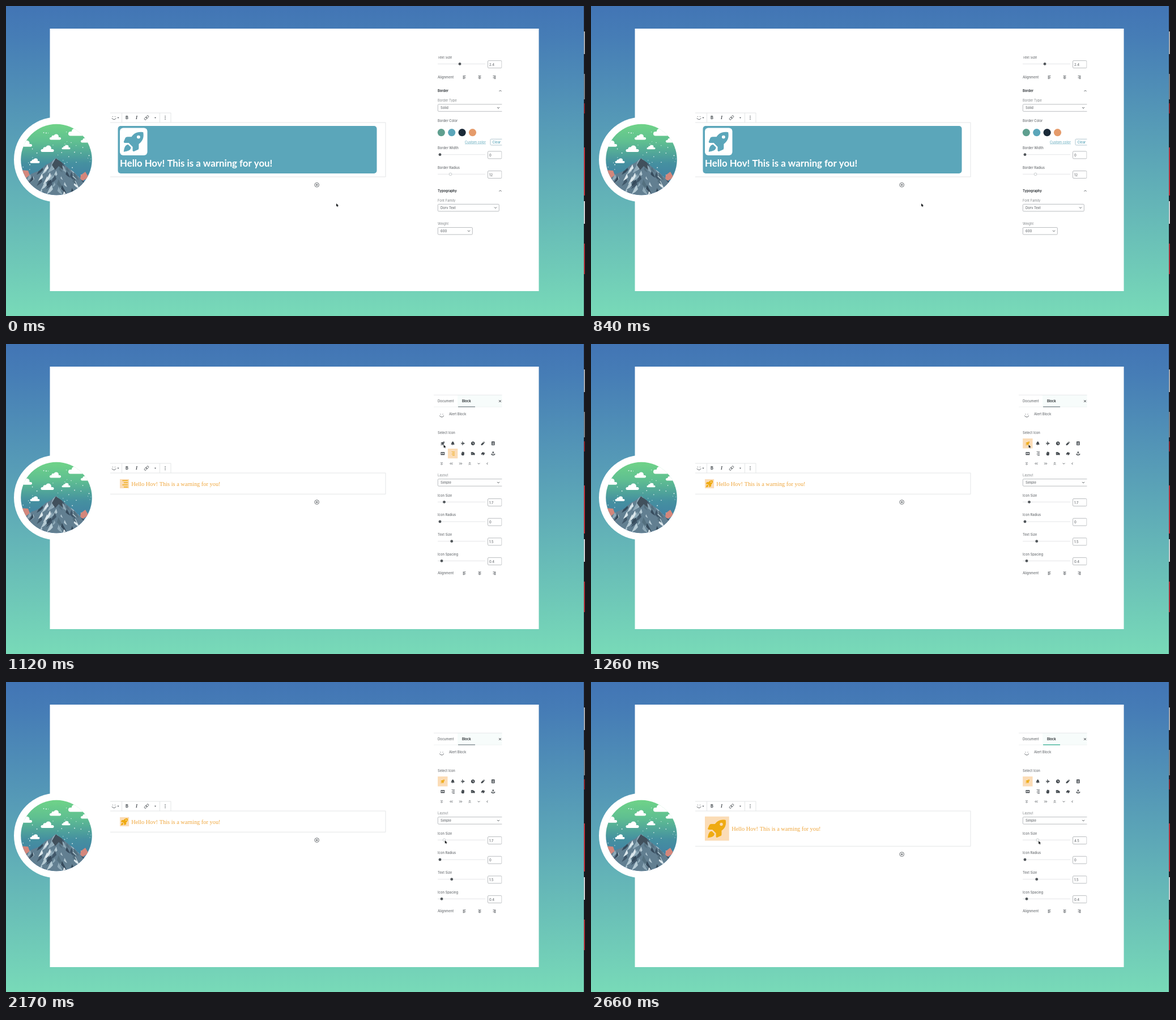
An HTML page with a canvas for the animation above (2.73 s loop, 1022 by 548 pixels).

```html
<!DOCTYPE html>
<html lang="en">
<head>
<meta charset="utf-8">
<title>Alert block settings</title>
<style>
html, body { margin: 0; width: 100%; height: 100%; overflow: hidden; }
canvas { display: block; }
</style>
</head>
<body>
<canvas id="stage" width="1022" height="548"></canvas>
<script>
const ctx = document.getElementById('stage').getContext('2d');
const LOOP = 2730, STEP = 70;
const TEAL = '#5ba6ba', ORANGE = '#efab12', PEACH = '#fbdcb6', DARK = '#444a4f', GREY = '#6c7074', LINE = '#e3e5e6';
const MESSAGE = 'Hello Hov! This is a warning for you!';

// Icons live in a 10 x 10 box, the rocket in a 36 x 36 box.
const ICONS = {
  rocket: 'M35 1C23-1 18 4 14 9H7Q4 9 3 11L0 18Q0 20 2 20H9L16 27V34Q17 36 19 35L26 32Q27 31 27 29V22C32 18 37 13 35 1ZM29.5 9.5a3 3 0 1 0-6 0a3 3 0 1 0 6 0ZM8 23C3 23 1 28 0 36C8 35 13 33 13 28Z',
  bell: 'M5 0C8 1 8 4 9.5 8H.5C2 4 2 1 5 0ZM4 8.7h2v1.3h-2Z',
  plane: 'M0 2L2 4H4L3 0H4.3L7 4H9Q11 5 9 6H7L4.3 10H3L4 6H2L0 8L1 5Z',
  clock: 'M5 0a5 5 0 1 0 .01 0ZM4.4 2h1.2v3l2 1.2-.6 1-2.6-1.6Z',
  pencil: 'M7 0L10 3L9 4L6 1ZM5.3 1.7L8.3 4.7L3 10H0V7Z',
  book: 'M1 0H9V10H1ZM5 2a1.4 1.4 0 1 0 .01 0ZM2.8 8Q3 5.5 5 5.5T7.2 8Z',
  card: 'M0 1.2H10V8.8H0ZM1.5 3.5h3v3h-3ZM5.5 3.5h3v3h-3Z',
  lines: 'M2 0h8v1.2h-8ZM4 3h6v1.2h-6ZM2 6h8v1.2h-8ZM4 9h6v1.2h-6Z',
  hand: 'M2.5 10L0 5H1L2 6V1.5H3.6V0H5V.7H6.6V1.7H8.6V7L7.5 10Z',
  truck: 'M0 1H6V3H8L10 5V8H9a1.3 1.3 0 1 1-2.6 0H4a1.3 1.3 0 1 1-2.6 0H0ZM2 3.6h2v1.4h-2Z',
  sign: 'M0 6L3 2L7 1L6 3L10 3L8 8L4 10L5 7L1 8Z',
  anchor: 'M4.4 3.5H3V2a2 2 0 1 1 4 0V3.5H5.6V8.5Q8 8 8.3 6.5H7L9 5L10.5 7Q9 10 5 10T-.5 7L1 5L3 6.5H1.7Q2 8 4.4 8.5Z',
  arrow: 'M0 0L0 9L2.2 7.2L3.8 10.5L5.4 9.8L4 6.6L6.8 6.5Z'
};
const paths = Object.fromEntries(Object.entries(ICONS).map(([name, d]) => [name, new Path2D(d)]));
const GRID = ['rocket', 'bell', 'plane', 'clock', 'pencil', 'book', 'card', 'lines', 'hand', 'truck', 'sign', 'anchor'];

const lerp = (a, b, p) => a + (b - a) * p;
const progress = (t, from, to) => t < from ? 0 : t > to ? 1 : (t - from) / (to - from);

function seeded(seed) {
  return () => (seed = (seed * 16807) % 2147483647) / 2147483647;
}

function rect(x, y, w, h, fill, stroke, r = 0) {
  ctx.beginPath();
  ctx.roundRect(x, y, w, h, r);
  if (fill) { ctx.fillStyle = fill; ctx.fill(); }
  if (stroke) { ctx.strokeStyle = stroke; ctx.lineWidth = 0.8; ctx.stroke(); }
}

function disc(x, y, r, fill, stroke) {
  ctx.beginPath();
  ctx.arc(x, y, r, 0, 7);
  if (fill) { ctx.fillStyle = fill; ctx.fill(); }
  if (stroke) { ctx.strokeStyle = stroke; ctx.lineWidth = 0.8; ctx.stroke(); }
}

function line(color, width, ...points) {
  ctx.beginPath();
  for (let i = 0; i < points.length; i += 2) ctx.lineTo(points[i], points[i + 1]);
  ctx.strokeStyle = color;
  ctx.lineWidth = width;
  ctx.stroke();
}

function shape(fill, ...points) {
  ctx.beginPath();
  for (let i = 0; i < points.length; i += 2) ctx.lineTo(points[i], points[i + 1]);
  ctx.fillStyle = fill;
  ctx.fill();
}

function text(s, x, baseline, color, font) {
  ctx.font = font;
  ctx.fillStyle = color;
  ctx.fillText(s, x, baseline);
}

// Small interface text, centred on y.
function label(s, x, y, color = GREY, weight = 500) {
  text(s, x, y + 2.1, color, `${weight} 5.8px Inter, sans-serif`);
}

function icon(name, x, y, size, color, outline) {
  const k = size / (name === 'rocket' ? 36 : 10);
  ctx.save();
  ctx.translate(x - size / 2, y - size / 2);
  ctx.scale(k, k);
  if (outline) { ctx.strokeStyle = outline; ctx.lineWidth = 1.6; ctx.stroke(paths[name]); }
  ctx.fillStyle = color;
  ctx.fill(paths[name], 'evenodd');
  ctx.restore();
}

function chevron(x, y, turns, size = 2, color = DARK) {
  ctx.save();
  ctx.translate(x, y);
  ctx.rotate(turns * Math.PI / 2);
  line(color, 0.9, -size, -size / 2, 0, size / 2, size, -size / 2);
  ctx.restore();
}

function smile(x, y) {
  disc(x - 2, y - 2, 0.6, DARK);
  disc(x + 2, y - 2, 0.6, DARK);
  ctx.beginPath();
  ctx.arc(x, y - 0.8, 3.8, 0.35, Math.PI - 0.35);
  ctx.strokeStyle = DARK;
  ctx.lineWidth = 0.8;
  ctx.stroke();
}

function cloud(x, y, w) {
  rect(x - w / 2, y, w, w * 0.22, '#fff', null, w * 0.11);
  disc(x - w * 0.17, y, w * 0.16, '#fff');
  disc(x + w * 0.08, y - w * 0.06, w * 0.22, '#fff');
}

function badge() {
  const rand = seeded(77);
  disc(89, 271.5, 75, '#fff');
  ctx.save();
  ctx.beginPath();
  ctx.arc(89, 271.5, 62.8, 0, 7);
  ctx.clip();
  const sky = ctx.createLinearGradient(0, 209, 0, 334);
  sky.addColorStop(0, '#6fd388');
  sky.addColorStop(0.25, '#5fbf91');
  sky.addColorStop(0.55, '#4590a0');
  sky.addColorStop(1, '#3f74a8');
  ctx.fillStyle = sky;
  ctx.fillRect(26, 208, 126, 127);
  for (let i = 0; i < 45; i++) disc(28 + rand() * 122, 222 + rand() * 80, 0.5 + rand() * 0.5, '#e8f6f4');
  [[87, 232, 20], [73, 253, 23], [106, 250, 15], [51, 274, 17], [127, 222, 34], [142, 237, 20], [35, 244, 22]]
    .forEach(c => cloud(...c));

  shape('#d4877c', 26, 290, 39, 291, 46, 310, 40, 330, 26, 320);
  shape('#d4877c', 132, 299, 140, 293, 146, 303, 130, 312);
  ctx.beginPath();
  [26, 312, 44, 297, 59, 291, 70, 281, 78, 277, 88, 269, 99, 277, 108, 285, 119, 293, 134, 308, 152, 318, 152, 336, 26, 336]
    .forEach((v, i, all) => i % 2 || ctx.lineTo(v, all[i + 1]));
  ctx.clip();
  ctx.fillStyle = '#627f91';
  ctx.fillRect(26, 266, 126, 70);
  const tones = ['#364b5c', '#dbe7ec', '#8faab8', '#41586a', '#b4cad4', '#54707f'];
  for (let i = 0; i < 95; i++) {
    const x = 28 + rand() * 122, y = 272 + rand() * 62, s = 3 + rand() * 6, lean = x < 89 ? -s : s;
    shape(tones[i % tones.length], x, y - s, x + lean, y + s, x + lean * 0.2, y + s * 0.5, x - lean * 0.3, y);
  }
  shape('#41505c', 88, 269, 81, 281, 87, 290, 93, 283, 101, 290, 98, 276);
  ctx.restore();
}

function backdrop() {
  const g = ctx.createLinearGradient(0, 0, 0, 548);
  g.addColorStop(0, '#4275b5');
  g.addColorStop(0.1, '#467db6');
  g.addColorStop(1, '#78dab8');
  ctx.fillStyle = g;
  ctx.fillRect(0, 0, 1022, 548);
  rect(1020, 0, 2, 548, '#1c1b22');
  [[45, 40, '#a5a6aa'], [120, 45, '#77797e'], [172, 18, '#7d2028'], [250, 85, '#b52f3a'], [345, 40, '#c9cacc'], [420, 54, '#a32b36']]
    .forEach(([y, h, color]) => rect(1020, y, 2, h, color));
  rect(77.5, 40, 863, 464, '#fff');
  badge();
}

function toolbar(y) {
  const mid = y + 8.5;
  line(LINE, 1, 184, y, 291, y, 291, y + 17);
  [204.5, 271.5].forEach(x => line(LINE, 1, x, y, x, y + 17));
  smile(190.5, mid);
  [198, 263.5].forEach(x => shape(DARK, x - 1.5, mid - 0.7, x + 1.5, mid - 0.7, x, mid + 1.2));
  text('B', 211, mid + 2.7, DARK, '700 7.5px Inter, sans-serif');
  text('I', 229, mid + 2.7, DARK, 'italic 700 8px "Liberation Serif", serif');
  ctx.save();
  ctx.translate(248, mid);
  ctx.rotate(-Math.PI / 4);
  rect(-4.6, -1.6, 5, 3.2, null, DARK, 1.6);
  rect(-0.4, -1.6, 5, 3.2, null, DARK, 1.6);
  ctx.restore();
  [-2.8, 0, 2.8].forEach(d => disc(281, mid + d, 0.75, DARK));
}

function editorBlock(top, bottom) {
  toolbar(top - 17);
  line(LINE, 1, 184, top, 670, top, 670, bottom, 184, bottom);
  const y = bottom + 14.2;
  disc(548.7, y, 3.8, null, DARK);
  line(DARK, 0.9, 546.8, y, 550.6, y);
  line(DARK, 0.9, 548.7, y - 1.9, 548.7, y + 1.9);
}

function slider(name, y, knob, value, active) {
  label(name, 762, y);
  line('#dcdfe1', 0.8, 762, y + 11.7, 846, y + 11.7);
  active ? disc(knob, y + 11.7, 2.3, '#fff', '#b9bec1') : disc(knob, y + 11.7, 2.4, '#51565a');
  rect(850.5, y + 5.9, 24.5, 13, '#fff', '#a9adb0', 1.5);
  label(value, 853, y + 12.8);
}

function select(name, y, width, value) {
  label(name, 762, y, '#85898c', 400);
  rect(762.3, y + 6.8, width, 12.5, '#fff', '#a9adb0', 1.5);
  label(value, 767, y + 13);
  chevron(762 + Math.min(width, 113) - 6, y + 13, 0);
}

function alignment(y) {
  label('Alignment', 762, y);
  [[809, 0], [836, 0.5], [862, 1]].forEach(([x, side]) => {
    [5, 3, 5, 3].forEach((w, i) => {
      const left = x - 2.5 + (5 - w) * side, row = y - 2.4 + i * 1.6;
      line(DARK, 0.8, left, row, left + w, row);
    });
  });
}

function section(name, y) {
  label(name, 762, y, '#22272b', 600);
  chevron(872.5, y, 2);
}

function clipSidebar() {
  ctx.save();
  ctx.beginPath();
  ctx.rect(755, 89, 120.4, 330);
  ctx.clip();
}

function stylePanel() {
  clipSidebar();
  slider('Text Size', 90.7, 801, '2.4');
  alignment(126);
  section('Border', 150);
  select('Border Type', 167, 116, 'Solid');
  label('Border Color', 762, 202.8);
  ['#5f9f8f', TEAL, '#1b2a38', '#e59b6b'].forEach((c, i) => disc(768.3 + i * 18.4, 223.6, 6.6, c));
  label('Custom color', 810, 240.7, TEAL, 400);
  line(TEAL, 0.5, 810, 243.9, 847, 243.9);
  rect(855, 235.3, 23, 10.6, '#fff', '#9fb9c4', 1.5);
  label('Clear', 858.5, 240.7, TEAL);
  slider('Border Width', 251, 766, '0');
  slider('Border Radius', 285.6, 784.5, '12', true);
  section('Typography', 326.8);
  select('Font Family', 343.6, 108, 'Dorv Text');
  select('Weight', 384.7, 61, '600');
  ctx.restore();
}

function iconGrid(selected) {
  GRID.forEach((name, i) => {
    const x = 770.8 + (i % 6) * 17.8, y = i < 6 ? 175.7 : 193.6, on = selected.includes(name);
    if (on) rect(x - 8.7, y - 8.7, 17.4, 17.4, PEACH);
    icon(name, x, y, name === 'sign' && on ? 8.5 : 6.8, on ? ORANGE : DARK);
  });
  const y = 211.4;
  [[769, 0], [818.5, 2]].forEach(([x, turn]) => [-1.3, 1.3].forEach(d => chevron(x, y + d, turn, 1.7)));
  [[786, 1], [802.5, 3]].forEach(([x, turn]) => [-1.3, 1.3].forEach(d => chevron(x + d, y, turn, 1.7)));
  chevron(834.5, y, 0, 1.7);
  chevron(849.5, y, 1, 1.7);
}

function blockPanel(t, selected, size) {
  clipSidebar();
  rect(755, 90, 121, 21, '#f7fcfb');
  rect(755, 90, 42, 21, '#fff');
  line(LINE, 0.8, 755, 90.2, 876, 90.2);
  line('#edf0f0', 0.8, 755, 111.2, 876, 111.2);
  line(t >= 2660 ? '#4db89f' : '#8a9599', 1.4, 798, 111, 828, 111);
  label('Document', 762, 101);
  label('Block', 805, 101, '#22272b', 600);
  line(DARK, 0.9, 870, 99, 874, 103);
  line(DARK, 0.9, 874, 99, 870, 103);
  smile(769, 126);
  label('Alert Block', 782, 124);
  label('Select Icon', 762, 156.7);
  iconGrid(selected);
  select('Layout', 231.9, 116, 'Simple');
  slider('Icon Size', 267.6, lerp(773.5, 788.3, (size - 1.7) / 2.8), size.toFixed(1), t >= 2100);
  slider('Icon Radius', 302.3, 766, '0');
  slider('Text Size', 337, 786.7, '1.5');
  slider('Icon Spacing', 371.7, 769, '0.4');
  alignment(405.3);
  ctx.restore();
}

function arrow(x, y) {
  icon('arrow', x + 3, y + 3, 6, '#15181a', '#fff');
}

function warningScene() {
  editorBlock(206, 302);
  rect(197.5, 212, 457, 84, TEAL, null, 5);
  rect(201, 215.6, 48.5, 48.5, '#fff', null, 6);
  icon('rocket', 225.5, 240, 35.5, TEAL);
  text(MESSAGE, 201, 284.3, '#fff', '700 16.8px Lato, sans-serif');
  stylePanel();
  arrow(583, 349);
}

function pickerScene(t) {
  const selected = t < 980 ? ['lines', 'sign'] : t < 1190 ? ['lines'] : ['rocket'];
  const current = selected[selected.length - 1];
  const size = lerp(1.7, 4.5, progress(t, 2240, 2660));
  const height = size * 9.5, width = current === 'sign' ? 19 : height;
  const grow = height - 16.15, middle = 247 + grow * 0.46;

  editorBlock(228, 265.3 + grow * 0.94);
  rect(201, middle - height / 2, width, height, PEACH);
  icon(current, 201 + width / 2, middle, height * 0.76, ORANGE);
  text(MESSAGE, 205 + width + grow * 0.015, middle + 3.5, '#efa63c', '10.37px "Liberation Serif", serif');
  blockPanel(t, selected, size);

  if (t < 1120) {
    const p = progress(t, 910, 1190);
    icon('hand', lerp(796, 773, p), lerp(194.5, 180, p), 6.5, '#fff', '#22272b');
  } else if (t < 1330) {
    arrow(772.5, 178);
  } else {
    const down = progress(t, 1330, 1680), grab = progress(t, 1890, 2100), drag = progress(t, 2240, 2660);
    arrow(lerp(772.5, 777.5, down) - 2.8 * grab + 15.3 * drag, lerp(178, 275, down) + 5 * grab + drag);
  }
}

function frame(now) {
  const t = Math.floor((now % LOOP) / STEP) * STEP;
  backdrop();
  t < 910 ? warningScene() : pickerScene(t);
  requestAnimationFrame(frame);
}
requestAnimationFrame(frame);
</script>
</body>
</html>
```
